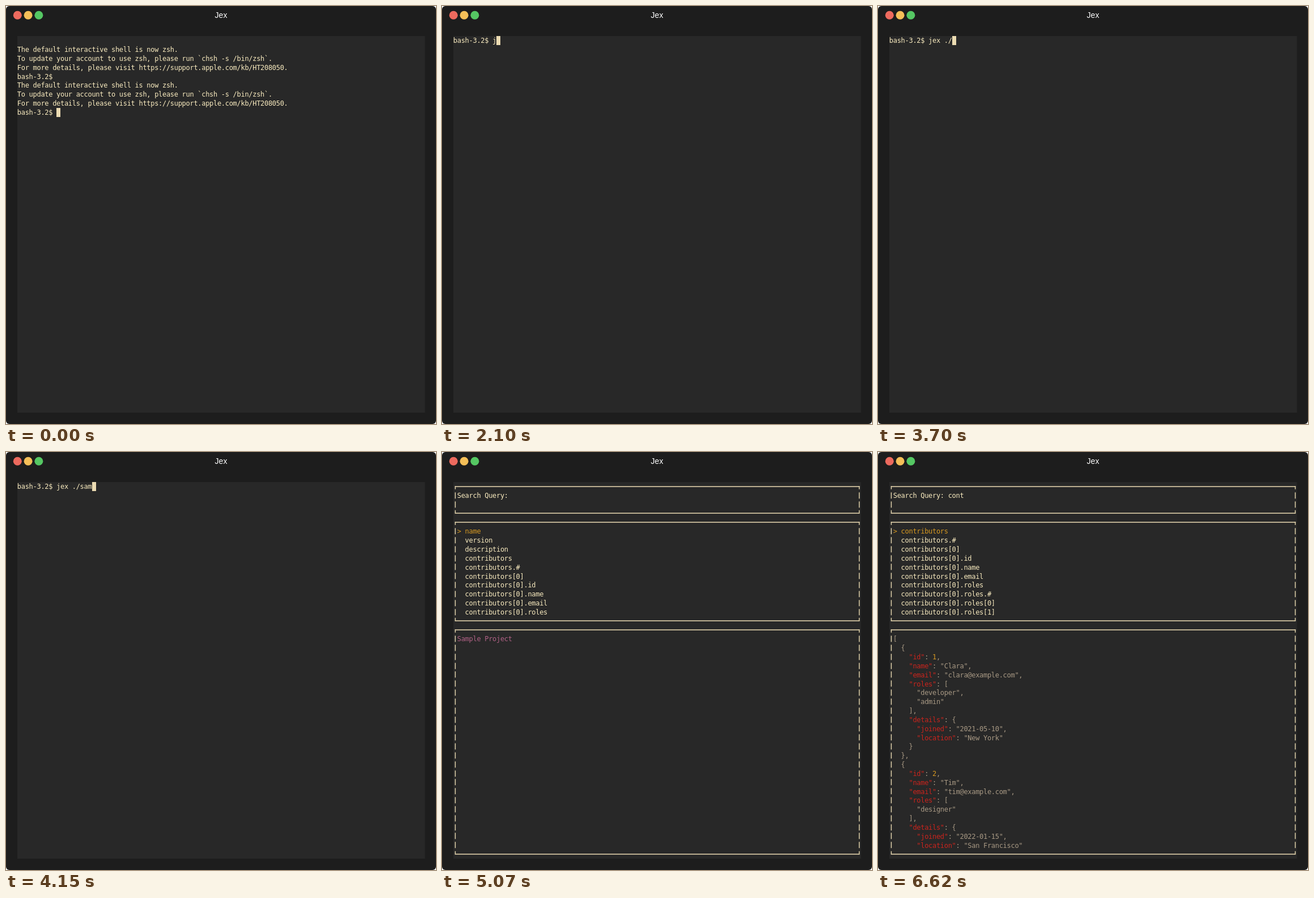
Recreate the animation shown at these times as an HTML page with a canvas. Size 759x738 px, loop 8 s.

```html
<!DOCTYPE html>
<html lang="en">
<head>
<meta charset="utf-8">
<title>Jex</title>
<style>
html, body { margin: 0; width: 100%; height: 100%; overflow: hidden; background: #fff; }
canvas { display: block; }
</style>
</head>
<body>
<canvas id="stage" width="759" height="738"></canvas>
<script>
const ctx = document.getElementById('stage').getContext('2d');
const LOOP = 8000, LEFT = 20, TOP = 53, COL = 6.923, ROW = 15.833, COLS = 104;
const FG = '#f9ebbf', LINE = '#ebdbb2', DIM = '#a89984', RED = '#cc241d', YELLOW = '#d79921', PINK = '#b16286';
const PROMPT = 'bash-3.2$ ';

const notice = [
  'The default interactive shell is now zsh.',
  'To update your account to use zsh, please run `chsh -s /bin/zsh`.',
  'For more details, please visit https://support.apple.com/kb/HT208050.'
];

// [start time, typed text]
const command = [[270, ''], [2100, 'j'], [2200, 'je'], [2400, 'jex'], [2580, 'jex '], [2850, 'jex .'],
  [3700, 'jex ./'], [3990, 'jex ./s'], [4070, 'jex ./sa'], [4150, 'jex ./sam'], [4310, 'jex ./sample.json ']];
const query = [[5070, ''], [6230, 'c'], [6350, 'co'], [6480, 'con'], [6620, 'cont']];

const paths = ['name', 'version', 'description', 'contributors', 'contributors.#',
  ...['', '.id', '.name', '.email', '.roles', '.roles.#', '.roles[0]', '.roles[1]'].map(s => 'contributors[0]' + s)];

const person = (id, name, roles, joined, location) =>
  ({ id, name, email: name.toLowerCase() + '@example.com', roles, details: { joined, location } });
const values = {
  name: 'Sample Project',
  description: 'A sample project for testing JSON queries.',
  contributors: [
    person(1, 'Clara', ['developer', 'admin'], '2021-05-10', 'New York'),
    person(2, 'Tim', ['designer'], '2022-01-15', 'San Francisco')
  ]
};

const textAt = (steps, t) => steps.filter(s => s[0] <= t).pop()[1];
const fuzzy = (word, q) => {
  let i = 0;
  for (const c of word) if (c === q[i]) i++;
  return i === q.length;
};

function write(text, col, row, color = FG) {
  ctx.fillStyle = color;
  [...text].forEach((c, i) => {
    if (c !== ' ') ctx.fillText(c, LEFT + (col + i + 0.5) * COL, TOP + row * ROW + 12.2);
  });
}

function cursor(col, row) {
  ctx.fillStyle = LINE;
  ctx.fillRect(Math.round(LEFT + col * COL), Math.round(TOP + row * ROW), 7, 16);
}

function box(first, last) {
  const mid = row => Math.round(TOP + (row + 0.5) * ROW) - 0.7;
  const x1 = LEFT + COL / 2 - 0.7, x2 = x1 + (COLS - 1) * COL;
  ctx.fillStyle = LINE;
  for (const row of [first, last]) ctx.fillRect(x1, mid(row), x2 - x1 + 1.4, 1.5);
  for (const x of [x1, x2]) {
    ctx.fillRect(x, mid(first), 1.4, 5.5);
    ctx.fillRect(x, mid(last) - 4.5, 1.4, 5.5);
    for (let row = first + 1; row < last; row++) ctx.fillRect(x, mid(row) - 5, 1.4, 11);
  }
}

function writeJson(value, row) {
  JSON.stringify(value, null, 2).split('\n').slice(0, 24).forEach((line, i) => {
    write(line, 1, row + i, DIM);
    const key = line.match(/^( *)("\w+"):/);
    if (!key) return;
    const number = line.match(/: (\d+)/);
    recolor(key[2], 1 + key[1].length, row + i, RED);
    if (number) recolor(number[1], 3 + number.index, row + i, YELLOW);
  });
}

function recolor(text, col, row, color) {
  ctx.fillStyle = '#282828';
  ctx.fillRect(LEFT + col * COL, TOP + row * ROW, text.length * COL, ROW);
  write(text, col, row, color);
}

function drawWindow() {
  ctx.clearRect(0, 0, 759, 738);
  ctx.fillStyle = '#1d1d1d';
  ctx.beginPath();
  ctx.roundRect(0, 0, 759, 738, 6);
  ctx.fill();
  ['#ed6a5e', '#f5bf58', '#55c763'].forEach((color, i) => {
    ctx.fillStyle = color;
    ctx.beginPath();
    ctx.arc(20.3 + i * 18.8, 16.3, 7.5, 0, Math.PI * 2);
    ctx.fill();
  });
  ctx.textAlign = 'center';
  ctx.font = '14px "Liberation Sans", Arial, sans-serif';
  ctx.fillStyle = '#fff';
  ctx.fillText('Jex', 379.5, 21);
  ctx.fillStyle = '#282828';
  ctx.fillRect(LEFT, TOP, 719.5, 665);
  ctx.font = '12px "DejaVu Sans Mono", monospace';
}

function drawSearch(t) {
  const q = textAt(query, t);
  const found = paths.filter(p => fuzzy(p, q)).slice(0, 10);
  const value = values[found[0]];
  box(0, 3);
  box(4, 15);
  box(16, 41);
  write('Search Query: ' + q, 1, 1);
  found.forEach((p, i) => write((i ? '  ' : '> ') + p, 1, 5 + i, i ? FG : YELLOW));
  if (typeof value === 'string') write(value, 1, 17, PINK);
  else writeJson(value, 17);
}

function draw(t) {
  drawWindow();
  if (t < 270) {
    for (const row of [1, 5]) {
      notice.forEach((line, i) => write(line, 0, row + i));
      write(PROMPT, 0, row + 3);
    }
    cursor(PROMPT.length, 8);
  } else if (t < 5070) {
    const line = PROMPT + textAt(command, t);
    write(line, 0, 0);
    if (t < 5050) cursor(line.length, 0);
    else cursor(0, 1);
  } else {
    drawSearch(t);
  }
}

const start = performance.now();
function tick() {
  draw((performance.now() - start) % LOOP);
  requestAnimationFrame(tick);
}
tick();
</script>
</body>
</html>
```
